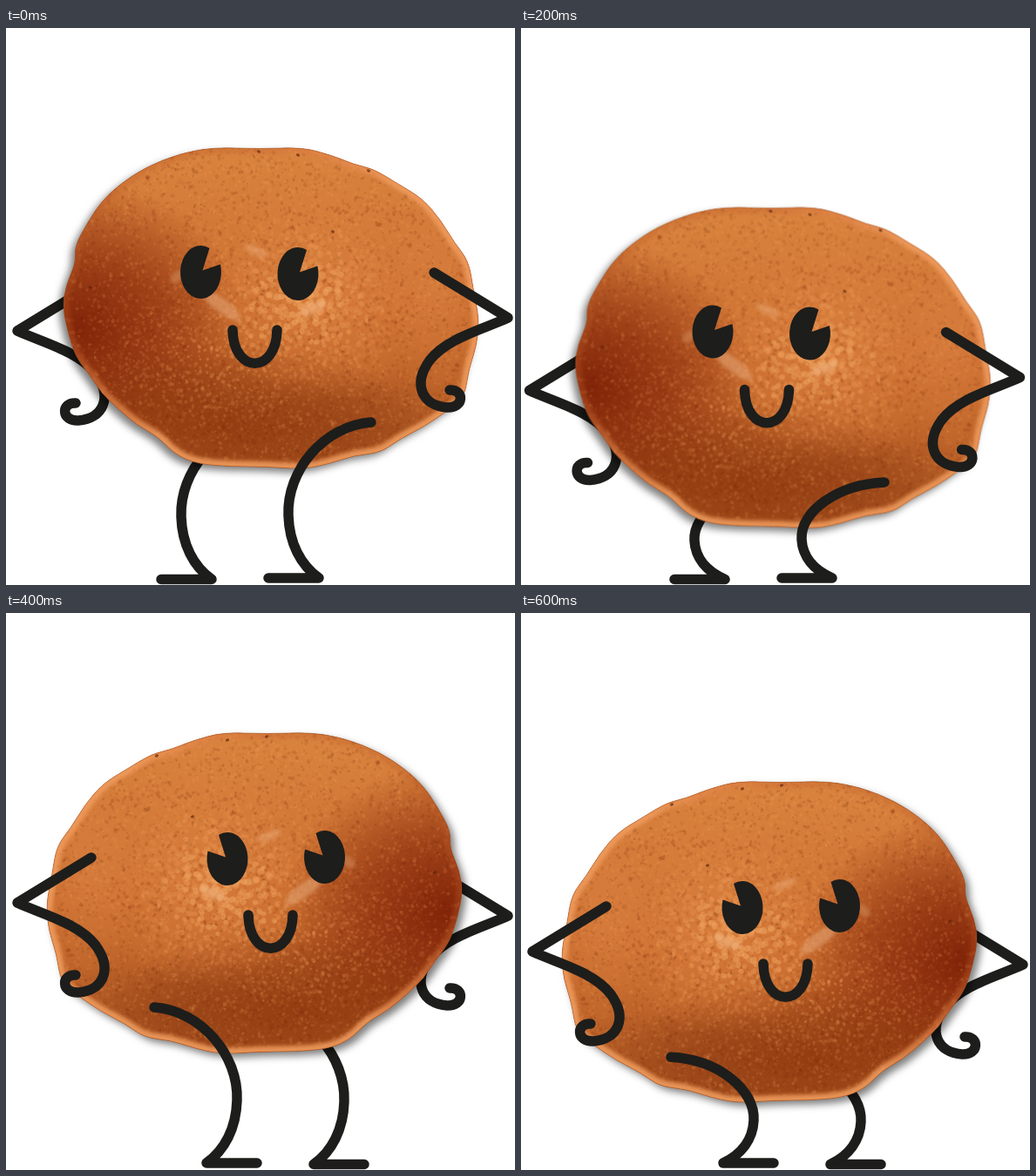
Animation, 584 px wide and 640 px high, one loop 0.8 s. Source, as an HTML page with a canvas:

```html
<!DOCTYPE html>
<html lang="en">
<head>
<meta charset="utf-8">
<title>Dancing pancake</title>
<style>
html, body { margin: 0; height: 100%; overflow: hidden; background: #fff; }
canvas { display: block; }
</style>
</head>
<body>
<canvas id="stage" width="584" height="640"></canvas>
<script>
const W = 584, H = 640, AXIS = 589, STEP = 200;
const INK = '#1d1d1b';
const ctx = document.getElementById('stage').getContext('2d');

// Each pose: mirrored?, body shift, leg shift, leg height
const poses = [
  { flip: false, dx: 0, dy: 0, legX: 0, bend: 1 },
  { flip: false, dx: -3.5, dy: 68.5, legX: -2, bend: 0.615 },
  { flip: true, dx: 0, dy: 0, legX: 0, bend: 1 },
  { flip: true, dx: 0, dy: 56, legX: 2, bend: 0.68 }
];

let seed = 7;
function rand() {
  seed = (seed * 16807) % 2147483647;
  return seed / 2147483647;
}

const rim = [
  [240, 137], [290, 139], [340, 137], [376, 147], [400, 157], [422, 162], [448, 178],
  [478, 196], [499, 221], [514, 246], [531, 268], [536, 300], [543, 335], [540, 365],
  [531, 392], [526, 425], [506, 440], [480, 458], [452, 472], [430, 488], [400, 491],
  [370, 501], [340, 507], [300, 504], [260, 504], [220, 501], [194, 490], [175, 470],
  [150, 456], [129, 438], [110, 420], [97, 400], [80, 378], [71, 350], [65, 320],
  [69, 295], [80, 270], [79, 250], [94, 223], [109, 200], [130, 180], [160, 160], [200, 144]
];

function smoothLoop(points) {
  const path = new Path2D();
  const n = points.length;
  for (let i = 0; i <= n; i++) {
    const [x, y] = points[i % n], [u, v] = points[(i + 1) % n];
    const mx = (x + u) / 2, my = (y + v) / 2;
    if (i) path.quadraticCurveTo(x, y, mx, my);
    else path.moveTo(mx, my);
  }
  return path;
}

function makePancake() {
  const canvas = document.createElement('canvas');
  canvas.width = W;
  canvas.height = H;
  const g = canvas.getContext('2d');
  const shape = smoothLoop(rim);

  // Soft round patch of colour, optionally flattened
  function glow(x, y, rx, ry, rgb, alpha) {
    g.save();
    g.translate(x, y);
    g.scale(rx, ry);
    const fill = g.createRadialGradient(0, 0, 0, 0, 0, 1);
    fill.addColorStop(0, `rgba(${rgb},${alpha})`);
    fill.addColorStop(0.5, `rgba(${rgb},${alpha * 0.6})`);
    fill.addColorStop(1, `rgba(${rgb},0)`);
    g.fillStyle = fill;
    g.fillRect(-1, -1, 2, 2);
    g.restore();
  }

  function blob(x, y, rx, ry, turn, color) {
    g.fillStyle = color;
    g.beginPath();
    g.ellipse(x, y, rx, ry, turn, 0, 7);
    g.fill();
  }

  g.save();
  g.shadowColor = 'rgba(0,0,0,.5)';
  g.shadowBlur = 8;
  g.shadowOffsetX = -5;
  g.shadowOffsetY = 5;
  g.fillStyle = '#c96f32';
  g.fill(shape);
  g.restore();

  g.save();
  g.clip(shape);
  const base = g.createLinearGradient(0, 137, 0, 507);
  base.addColorStop(0, '#d9843f');
  base.addColorStop(0.5, '#ca6c2e');
  base.addColorStop(1, '#b05a24');
  g.fillStyle = base;
  g.fillRect(0, 0, W, H);
  glow(85, 345, 190, 170, '125,32,6', 0.95);
  glow(250, 455, 220, 95, '134,48,10', 0.75);
  glow(400, 460, 150, 70, '140,58,18', 0.45);
  glow(365, 300, 150, 130, '222,132,66', 0.6);
  glow(500, 290, 60, 130, '220,132,68', 0.5);

  // Fine grain
  for (let i = 0; i < 9000; i++) {
    const x = 60 + rand() * 490, y = 135 + rand() * 375;
    const tone = rand() < 0.5 ? '240,160,90' : '110,35,5';
    const size = 0.6 + rand() * 1.5;
    blob(x, y, size * 1.3, size, rand() * 3, `rgba(${tone},${0.05 + rand() * 0.14})`);
  }

  // Pale bubbles, strongest around the centre
  for (let y = 200; y < 485; y += 7.5) {
    for (let x = 90; x < 520; x += 8) {
      const px = x + (rand() - 0.5) * 8, py = y + (rand() - 0.5) * 8;
      const main = Math.exp(-(((px - 345) / 75) ** 2) - ((py - 305) / 65) ** 2);
      const low = Math.exp(-(((px - 250) / 120) ** 2) - ((py - 385) / 70) ** 2);
      const size = 1 + main * 2.2 + rand() * 1.2;
      const alpha = (main * 0.6 + low * 0.35) * (0.4 + rand() * 0.6);
      blob(px, py, size * 1.25, size, rand() * 3, `rgba(240,166,98,${alpha})`);
    }
  }

  // Glossy streaks
  g.filter = 'blur(2px)';
  blob(246, 318, 28, 8, 0.65, 'rgba(226,160,112,.6)');
  blob(196, 286, 9, 6, 2.4, 'rgba(205,130,80,.65)');
  blob(287, 256, 15, 5, 0.4, 'rgba(232,165,115,.5)');
  blob(352, 322, 17, 6, -0.4, 'rgba(240,178,125,.6)');

  // Lighter edge, fading out on the dark side
  const edge = g.createLinearGradient(85, 330, 205, 440);
  edge.addColorStop(0, 'rgba(190,90,40,.3)');
  edge.addColorStop(0.45, 'rgba(225,130,72,.6)');
  edge.addColorStop(1, 'rgba(238,154,92,.9)');
  g.strokeStyle = edge;
  g.lineWidth = 13;
  g.stroke(shape);
  g.filter = 'none';

  for (const [x, y] of [[290, 142], [375, 234], [97, 298], [416, 164], [335, 146]])
    blob(x, y, 2.2, 1.6, 0.5, 'rgba(95,35,10,.65)');
  g.restore();

  g.strokeStyle = 'rgba(150,70,28,.45)';
  g.lineWidth = 1;
  g.stroke(shape);
  return canvas;
}

const pancake = makePancake();
const arm = new Path2D('M491 281L576 333C545 347 505 357 486 382C466 410 478 434 506 436C526 437 526 415 509 416');
const mouth = new Path2D('M260 347C261 398 310 398 311 347');

function drawArm(back) {
  ctx.save();
  if (back) {
    ctx.translate(AXIS, 15);
    ctx.scale(-1, 1);
  }
  ctx.stroke(arm);
  ctx.restore();
}

function drawLeg(x, y, bend) {
  const fy = v => 632 + y + (v - 632) * bend;
  ctx.beginPath();
  ctx.moveTo(419 + x, fy(453));
  ctx.bezierCurveTo(365 + x, fy(457), 322 + x, fy(508), 324 + x, fy(560));
  ctx.bezierCurveTo(325 + x, fy(592), 338 + x, fy(617), 359 + x, fy(632));
  ctx.lineTo(301 + x, fy(632));
  ctx.stroke();
}

function drawEye(x, y) {
  ctx.beginPath();
  ctx.moveTo(x + 2, y - 2);
  ctx.ellipse(x, y, 23.5, 30.5, 0, -0.3, 2 * Math.PI - 1.13);
  ctx.fill();
}

function draw({ flip, dx, dy, legX, bend }) {
  ctx.setTransform(1, 0, 0, 1, 0, 0);
  ctx.fillStyle = '#fff';
  ctx.fillRect(0, 0, W, H);
  ctx.fillStyle = ctx.strokeStyle = INK;
  ctx.lineWidth = 11.5;
  ctx.lineCap = ctx.lineJoin = 'round';

  const place = (x, y) => flip
    ? ctx.setTransform(-1, 0, 0, 1, AXIS + x, y)
    : ctx.setTransform(1, 0, 0, 1, x, y);

  place(legX, 0);
  drawLeg(-123, 1.5, bend);
  place(dx, dy);
  drawArm(true);
  ctx.drawImage(pancake, 0, 0);
  drawEye(223.5, 280.5);
  drawEye(335, 282.5);
  ctx.stroke(mouth);
  drawArm(false);
  place(legX, 0);
  drawLeg(0, 0, bend);
}

const start = performance.now();
function tick() {
  const time = Math.max(0, performance.now() - start);
  draw(poses[Math.floor(time / STEP) % poses.length]);
  requestAnimationFrame(tick);
}
tick();
</script>
</body>
</html>
```
